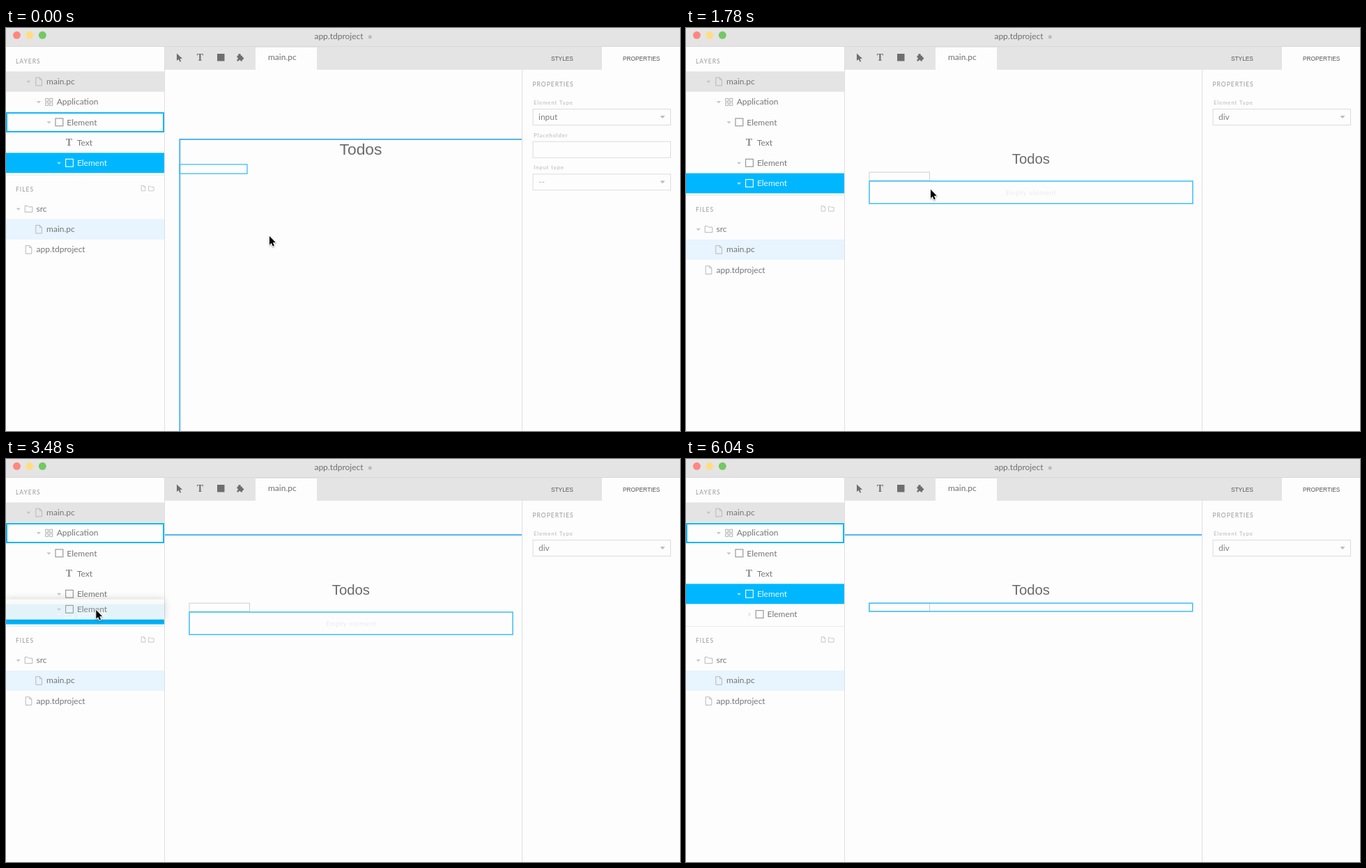
Write an HTML page with a canvas that moves like this. It is 967 by 579 pixels and loops after 6970 ms.

```html
<!DOCTYPE html>
<html lang="en">
<head>
<meta charset="utf-8">
<title>app.tdproject</title>
<style>
  html, body { margin: 0; width: 100%; height: 100%; overflow: hidden; background: #fdfdfd; }
  canvas { display: block; }
</style>
</head>
<body>
<canvas id="stage" width="967" height="579"></canvas>
<script>
const ctx = document.getElementById('stage').getContext('2d');
const LOOP = 6970;
const ROW = 29.25, ROWS_TOP = 62.4, INDENT = 14.6, SIDE = 227;
const PAPER = '#fdfdfd', BAR = '#e4e4e4', RULE = '#e0e0e0';
const BLUE = '#00b7ff', HOVER = '#55b4f0', INK = '#777', ICON = '#6e6e6e';
const SANS = 'Lato, sans-serif', HELV = '"Liberation Sans", Arial, sans-serif';
const SERIF = '"Liberation Serif", serif';

function fill(color, x, y, w, h) {
  ctx.fillStyle = color;
  ctx.fillRect(x, y, w, h);
}

function box(color, x, y, w, h, line = 1) {
  ctx.strokeStyle = color;
  ctx.lineWidth = line;
  ctx.strokeRect(x, y, w, h);
}

function path(points, closed = true) {
  ctx.beginPath();
  points.forEach(([x, y]) => ctx.lineTo(x, y));
  if (closed) ctx.closePath();
}

function shape(color, points) {
  path(points);
  ctx.fillStyle = color;
  ctx.fill();
}

function outline(color, points, line = 1, closed = true) {
  path(points, closed);
  ctx.strokeStyle = color;
  ctx.lineWidth = line;
  ctx.stroke();
}

function disc(color, x, y, r) {
  ctx.beginPath();
  ctx.arc(x, y, r, 0, 7);
  ctx.fillStyle = color;
  ctx.fill();
}

function text(str, x, y, { size = 12, color = INK, font = SANS, weight = '', gap = 0, align = 'left' } = {}) {
  ctx.font = `${weight} ${size}px ${font}`;
  ctx.letterSpacing = gap + 'px';
  ctx.textAlign = align;
  ctx.fillStyle = color;
  ctx.fillText(str, x, y);
}

const heading = (str, x, y) => text(str, x, y, { size: 8.5, gap: 1, color: '#999' });
const serifT = (x, y, color) =>
  text('T', x, y, { size: 14, font: SERIF, weight: 'bold', align: 'center', color });

// ---- timing ----

// Fraction of n evenly spaced jumps done, the first at `from`, the last at `to`.
function steps(t, from, to, n) {
  if (t < from) return 0;
  return Math.min(n, Math.floor((t - from) / (to - from) * (n - 1) + 1e-6) + 1) / n;
}

function along(points, p) {
  const f = p * (points.length - 1);
  const i = Math.min(Math.floor(f), points.length - 2);
  return [0, 1].map(k => points[i][k] + (points[i + 1][k] - points[i][k]) * (f - i));
}

const MOVES = [
  { from: 624, to: 1010, n: 5, via: [[378, 299], [400, 272], [417, 255]] },
  { from: 1280, to: 1281, n: 1, via: [[417, 255], [417, 252]] },
  { from: 1780, to: 2430, n: 8, via: [[417, 252], [285, 212], [162, 190], [142, 200], [134, 209]] },
  { from: 2520, to: 2780, n: 4, via: [[134, 209], [130, 195]] },
  { from: 2960, to: 3650, n: 9, via: [[130, 195], [130, 206], [129, 215.5], [130, 220]] },
  { from: 4190, to: 4660, n: 6, via: [[130, 220], [409, 216]] },
  { from: 4920, to: 5040, n: 2, via: [[409, 216], [405.5, 217]] },
  { from: 5490, to: 5660, n: 3, via: [[405.5, 217], [404, 290], [398, 430], [390, 562]] },
  { from: 5930, to: 6040, n: 2, via: [[390, 562], [389, 576], [389, 600]] }
];

function pointer(t) {
  const move = MOVES.filter(m => t >= m.from).pop();
  return move ? along(move.via, steps(t, move.from, move.to, move.n)) : MOVES[0].via[0];
}

function zoom(t) {
  const p = t < 80 ? 0 : (1 + 4 * steps(t, 230, 526, 4)) / 5;
  return 1 - 0.108 * p * p * (3 - 2 * p);
}

function hovered(t) {
  if (t < 1400) return 'element';
  if (t < 1966) return '';
  if (t < 4378) return 'application';
  if (t < 5490) return '';
  return t < 5930 ? 'element' : 'application';
}

// ---- icons ----

function fileIcon(x, y, color, k = 1) {
  const w = 4.3 * k, h = 5.8 * k, f = 3 * k;
  outline(color, [[x - w, y - h], [x + w - f, y - h], [x + w, y - h + f], [x + w, y + h], [x - w, y + h]]);
  outline(color, [[x + w - f, y - h], [x + w - f, y - h + f], [x + w, y - h + f]], 1, false);
}

function folderIcon(x, y, color, k = 1) {
  const pts = [[-5.3, -4.5], [-1.5, -4.5], [0, -3], [5.3, -3], [5.3, 4.5], [-5.3, 4.5]];
  outline(color, pts.map(([a, b]) => [x + a * k, y + b * k]));
}

function chevron(x, y, open, color) {
  if (open) shape(color, [[x - 3, y - 1.2], [x + 3, y - 1.2], [x, y + 2]]);
  else outline(color, [[x - 1.2, y - 2.6], [x + 1.4, y], [x - 1.2, y + 2.6]], 1, false);
}

const ICONS = {
  file: (x, y, c) => fileIcon(x, y, c || '#b8b8b8'),
  folder: (x, y, c) => folderIcon(x, y, c || '#b8b8b8'),
  element: (x, y, c) => box(c || '#999', x - 5.3, y - 5.6, 10.8, 10.8, 1.2),
  text: (x, y, c) => serifT(x - 0.5, y + 4.6, c || '#888'),
  grid: (x, y, c) => {
    for (const dx of [-5, 1]) for (const dy of [-5, 1]) box(c || '#b0b0b0', x + dx, y + dy, 4, 4);
  }
};

// ---- panels ----

function row({ label, icon, depth, open }, y, color) {
  const x = 32.3 + INDENT * depth;
  if (open !== undefined) chevron(x, y, open, color ? '#9be2ff' : '#c4c4c4');
  ICONS[icon](x + 14.8, y, color);
  text(label, x + 25.8, y + 4, { color: color || INK });
}

const element = (depth, open) => ({ label: 'Element', icon: 'element', depth, open });

function layers(t) {
  const list = [
    { label: 'main.pc', icon: 'file', depth: 0, open: true },
    { label: 'Application', icon: 'grid', depth: 1, open: true },
    element(2, true),
    { label: 'Text', icon: 'text', depth: 3 },
    element(3, true)
  ];
  const nested = t >= 3830;
  if (t >= 1280) list.push(nested ? element(4, false) : element(3, t >= 1400));
  const selected = t >= 1400 && !nested ? 5 : 4;
  const outlined = { application: 1, element: 2 }[hovered(t)];

  heading('LAYERS', 14, 51);
  list.forEach((item, i) => {
    const top = ROWS_TOP + ROW * i;
    if (i === 0) fill(BAR, 0, top, SIDE, ROW);
    if (i === selected) fill(BLUE, 0, top, SIDE, ROW - 0.4);
    if (i === outlined) box('#14b6f8', 1, Math.round(top) + 1, SIDE - 2, 27, 2);
    row(item, top + 14.6, i === selected ? '#e9f8ff' : undefined);
  });
  return ROWS_TOP + ROW * list.length;
}

function files(top) {
  fill('#ececec', 0, Math.round(top + 2), SIDE, 1);
  heading('FILES', 14, top + 26.4);
  fileIcon(197, top + 21.5, '#c8c8c8', 0.65);
  folderIcon(208.3, top + 22, '#c8c8c8', 0.72);
  const first = top + 51.3;
  fill('#e8f4fe', 0, first + ROW / 2, SIDE, ROW);
  row({ label: 'src', icon: 'folder', depth: -1, open: true }, first);
  row({ label: 'main.pc', icon: 'file', depth: 0 }, first + ROW);
  row({ label: 'app.tdproject', icon: 'file', depth: -1 }, first + ROW * 2);
}

function field(label, value, y, select) {
  text(label, 757, y - 18, { size: 8, gap: 0.75, color: '#b8b8b8' });
  box('#dcdcdc', 756, y - 11.5, 197.5, 23);
  text(value, 764, y + 4, { color: value === '--' ? '#b0b0b0' : '#808080' });
  if (select) shape('#bbb', [[938.5, y - 2], [945.5, y - 2], [942, y + 2]]);
}

function properties(t) {
  const isInput = t < 1400;
  heading('PROPERTIES', 755.5, 83.5);
  field('Element Type', isInput ? 'input' : 'div', 128, true);
  if (!isInput) return;
  field('Placeholder', '', 174.7, false);
  field('Input type', '--', 221.4, true);
}

function chrome() {
  fill(BAR, 0, 0, 967, 27);
  fill('#d9d9d9', 0, 26, 967, 1);
  ['#ff8782', '#ffdd86', '#74c864'].forEach((c, i) => disc(c, 15.5 + 18.4 * i, 10.3, 5.5));
  text('app.tdproject', 477.5, 16.3, { align: 'center', color: '#707070' });
  disc('#bdbdbd', 522.3, 12.8, 2.6);

  fill(BAR, 228, 27, 627, 33);
  fill(PAPER, 358, 28, 88, 32);
  text('main.pc', 376, 46, { color: '#707070' });
  shape(ICON, [[245, 36.5], [245, 47], [247.6, 45], [249.7, 48.8], [251.2, 48], [249.4, 44.3], [253, 44]]);
  serifT(278.5, 47, ICON);
  fill(ICON, 303, 37, 10.5, 10.5);
  fill(ICON, 331.5, 39.8, 7.5, 7.7);
  disc(ICON, 335, 39, 2);
  disc(ICON, 339.3, 43.6, 1.8);
  disc(BAR, 331.7, 43.8, 1.3);
  disc(BAR, 335.2, 47.3, 1.3);
  text('STYLES', 782, 46.8, { size: 8.3, font: HELV, color: '#555' });
  text('PROPERTIES', 885, 46.8, { size: 8.3, font: HELV, color: '#555' });

  fill(RULE, SIDE, 27, 1, 552);
  fill(RULE, 740, 60, 1, 519);
}

// ---- artboard ----

function artboard(t) {
  const s = zoom(t), hover = hovered(t);
  const X = x => 378 + (x - 378) * s, Y = y => 299 + (y - 299) * s;
  const frame = (color, x0, y0, x1, y1, line) => box(color, X(x0), Y(y0), X(x1) - X(x0), Y(y1) - Y(y0), line);
  const SELECT = '#3dbdf8';

  ctx.save();
  ctx.beginPath();
  ctx.rect(228, 60, 512, 519);
  ctx.clip();

  text('Todos', X(509), Y(182), { size: 22.8 * s, font: HELV, align: 'center', color: '#6b6b6b' });
  frame(t < 1400 ? SELECT : '#cfcfcf', 249, 196, 346, 209.3, t < 1400 ? 1.3 : 1);
  if (t >= 3830) {
    frame(SELECT, 249, 196, 769, 209.3, 1.5);
  } else if (t >= 1400) {
    text('Empty element', 495, 240, { size: 10, gap: 0.5, align: 'center', color: '#ebebeb' });
    box(SELECT, 263, 220, 464, 32.3, 1.5);
  }
  if (hover === 'application') fill(HOVER, 228, 108, 512, 2);
  if (hover === 'element' && (t < 1280 || t >= 5490)) frame(HOVER, 249.3, 160, 769, 606, 2);
  ctx.restore();
}

function dragged(t, y) {
  if (t < 2960 || t >= 3740) return;
  const center = ROWS_TOP + ROW * 4 + 14.6 + y - 195;
  ctx.save();
  ctx.globalAlpha = 0.9;
  ctx.shadowColor = 'rgba(0,0,0,.2)';
  ctx.shadowBlur = 11;
  fill(PAPER, 0, center - 14.6, SIDE, ROW);
  ctx.shadowColor = 'transparent';
  row(element(3, true), center);
  ctx.restore();
}

function cursor(t, x, y) {
  if (t >= 6040) return;
  ctx.save();
  ctx.translate(x, y);
  if (t >= 624 && t < 1280) {
    for (const [color, line, r] of [['#fff', 2.6, 6.8], ['#222', 1, 6]]) {
      outline(color, [[-r, 0.5], [r + 1, 0.5]], line, false);
      outline(color, [[0.5, -r], [0.5, r + 1]], line, false);
    }
  } else {
    const arrow = [[0, 0], [0, 12.4], [2.8, 9.9], [4.8, 14.6], [6.8, 13.7], [4.9, 9.2], [8.8, 9]];
    ctx.lineJoin = 'round';
    ctx.shadowColor = 'rgba(0,0,0,.35)';
    ctx.shadowBlur = 2;
    ctx.shadowOffsetY = 1;
    outline('#fff', arrow, 1.8);
    ctx.shadowColor = 'transparent';
    shape('#000', arrow);
  }
  ctx.restore();
}

function draw(t) {
  const [x, y] = pointer(t);
  fill(PAPER, 0, 0, 967, 579);
  chrome();
  files(layers(t));
  properties(t);
  artboard(t);
  dragged(t, y);
  cursor(t, x, y);
}

const start = performance.now();
function tick() {
  draw((performance.now() - start) % LOOP);
  requestAnimationFrame(tick);
}
tick();
</script>
</body>
</html>
```
